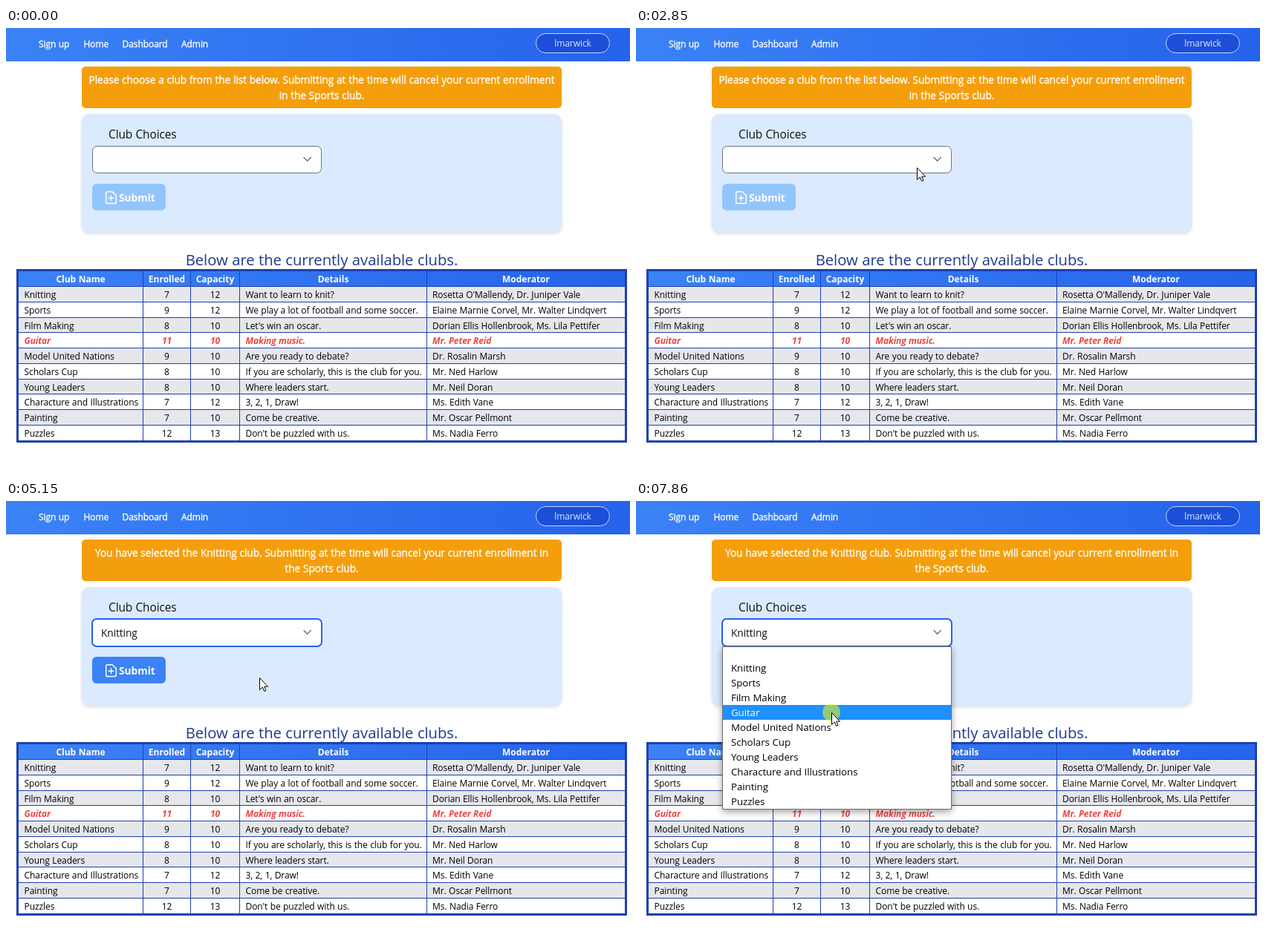
These frames come from a looping animation (840x600 px, 7990 ms). An HTML page:

```html
<!DOCTYPE html>
<html lang="en">
<head>
<meta charset="utf-8">
<title>Club enrollment</title>
<style>
html, body { margin: 0; width: 100%; height: 100%; overflow: hidden; background: #fff; }
svg { position: absolute; left: 0; top: 0; }
svg, #list { font: 12px "Open Sans", "Noto Sans", sans-serif; letter-spacing: -.006em; word-spacing: .03em; }
.bold { font-weight: 700; letter-spacing: 0; }
.full { font-weight: 700; font-style: italic; letter-spacing: -.01em; fill: #ef4444; }
.mid { text-anchor: middle; }
.nav, .note { fill: #fff; stroke: #fff; stroke-width: .35px; }
.note { font-size: 13.7px; text-anchor: middle; }
.grid { stroke: #1e40af; fill: none; shape-rendering: crispEdges; }
#panel { filter: drop-shadow(0 2px 2px rgba(0,0,0,.13)); }
#list { position: absolute; left: 116px; top: 196px; width: 309px; height: 220px; box-shadow: 0 3px 9px rgba(0,0,0,.38); }
#items { position: absolute; inset: 0; box-sizing: border-box; border: 1px solid #707070; background: #fff; overflow: hidden; font-size: 13.3px; color: #000; }
#items div { position: absolute; left: 0; right: 0; height: 20px; line-height: 20px; padding-left: 11px; white-space: pre; }
#items .on { background: #1e90ff; color: #fff; }
</style>
</head>
<body>
<svg id="page" width="840" height="600">
  <defs>
    <linearGradient id="blue"><stop stop-color="#3b82f6"/><stop offset="1" stop-color="#2563eb"/></linearGradient>
  </defs>
  <rect width="840" height="45" fill="url(#blue)"/>
  <g class="nav">
    <text x="44" y="26">Sign up</text>
    <text x="104.5" y="26">Home</text>
    <text x="156.5" y="26">Dashboard</text>
    <text x="236" y="26">Admin</text>
  </g>
  <rect x="713.5" y="7.5" width="99" height="26" rx="13" fill="#1d4ed8" stroke="#bfdbfe"/>
  <text class="mid" x="763" y="25" fill="#dbeafe">lmarwick</text>

  <rect x="102" y="52" width="646" height="56" rx="5" fill="#f59e0b"/>
  <text class="note" id="note1" x="425" y="75"></text>
  <text class="note" id="note2" x="425" y="96"></text>

  <rect id="panel" x="102" y="116" width="646" height="160" rx="10" fill="#dbeafe"/>
  <text x="138" y="149" font-size="15.4" fill="#111">Club Choices</text>
  <rect id="field" x="116.5" y="159.5" width="308" height="36" rx="6" fill="#fff"/>
  <path d="M401 174.5l4.7 4.7 4.7-4.7" fill="none" stroke="#6b7280" stroke-width="1.5" stroke-linecap="round"/>
  <text id="choice" x="128" y="183" font-size="13.7" fill="#111"></text>

  <rect id="button" x="116" y="210" width="99" height="36" rx="6"/>
  <path d="M143 220.7h-6.5q-1.8 0-1.8 1.8v12.2q0 1.8 1.8 1.8h10q1.8 0 1.8-1.8v-8.8zM141.5 226v6.4M138.3 229.2h6.4" fill="none" stroke="#fff" stroke-width="1.5" stroke-linejoin="round" stroke-linecap="round"/>
  <text class="bold" x="152" y="234" font-size="13.7" fill="#fff">Submit</text>

  <text class="mid" x="425" y="319.5" font-size="20.3" fill="#1e3a8a">Below are the currently available clubs.</text>
  <g id="table"></g>
</svg>

<div id="list"><div id="items"></div></div>

<svg width="840" height="600">
  <circle id="halo" r="12" fill="#ff0" fill-opacity=".52"/>
  <path id="cursor" d="M.5.5V16.5L4.3 13 6.7 18.5 9 17.5 6.7 12.2H11.5Z" fill="#fff" stroke="#000"/>
</svg>

<script>
const LOOP = 7990;
const $ = id => document.getElementById(id);

const clubs = [
  ["Knitting", 7, 12, "Want to learn to knit?", "Rosetta O'Mallendy, Dr. Juniper Vale"],
  ["Sports", 9, 12, "We play a lot of football and some soccer.", "Elaine Marnie Corvel, Mr. Walter Lindqvert"],
  ["Film Making", 8, 10, "Let's win an oscar.", "Dorian Ellis Hollenbrook, Ms. Lila Pettifer"],
  ["Guitar", 11, 10, "Making music.", "Mr. Peter Reid"],
  ["Model United Nations", 9, 10, "Are you ready to debate?", "Dr. Rosalin Marsh"],
  ["Scholars Cup", 8, 10, "If you are scholarly, this is the club for you.", "Mr. Ned Harlow"],
  ["Young Leaders", 8, 10, "Where leaders start.", "Mr. Neil Doran"],
  ["Characture and Illustrations", 7, 12, "3, 2, 1, Draw!", "Ms. Edith Vane"],
  ["Painting", 7, 10, "Come be creative.", "Mr. Oscar Pellmont"],
  ["Puzzles", 12, 13, "Don't be puzzled with us.", "Ms. Nadia Ferro"]
];
const heads = [["Club Name", 100.5], ["Enrolled", 216.5], ["Capacity", 281.5], ["Details", 440.5], ["Moderator", 700]];
const cellX = [24.5, 216.5, 281.5, 322.5, 574];
const TOP = 348.5, ROW = 20.78;

function buildTable() {
  let out = '<rect x="16" y="327" width="818" height="21" fill="url(#blue)"/>';
  for (const [label, x] of heads) out += `<text class="bold mid" x="${x}" y="343" fill="#fff">${label}</text>`;
  let lines = "M184.5 327V557M248.5 327V557M314.5 327V557M566.5 327V557";
  clubs.forEach((club, i) => {
    const y = Math.floor(TOP + i * ROW);
    const next = Math.floor(TOP + (i + 1) * ROW);
    const row = club[1] > club[2] ? "full" : "";
    out += `<rect x="16" y="${y}" width="818" height="${next - y}" fill="${i % 2 ? "#fff" : "#e5e7eb"}"/>`;
    club.forEach((cell, c) => {
      const mid = c === 1 || c === 2 ? "mid" : "";
      out += `<text class="${row} ${mid}" x="${cellX[c]}" y="${Math.round(364 + i * 20.75)}">${cell}</text>`;
    });
    lines += `M16 ${y + .5}H834`;
  });
  out += `<path class="grid" d="${lines}"/><rect class="grid" x="15.5" y="326.5" width="819" height="231" stroke-width="3"/>`;
  $("table").innerHTML = out;
}

const options = ["", ...clubs.map(c => c[0])].map((label, i) => {
  const el = document.createElement("div");
  el.style.top = i * 20 - 2 + "px";
  el.textContent = label;
  $("items").append(el);
  return el;
});

// start, end, steps, from, control, to, ease power
const moves = [
  [210, 600, 6, [610, 531], [420, 120], [198, 0], 1],
  [610, 1000, 7, [198, 0], [20, 150], [0, 590], 1],
  [1070, 1770, 11, [0, 590], [560, -190], [778, 71], 1.5],
  [2500, 2850, 6, [778, 71], [430, 250], [378, 188], 1.5],
  [3860, 3930, 2, [378, 188], [381, 205], [381, 230], 1],
  [5150, 5690, 9, [381, 230], [276, 256], [172, 231], 1.8],
  [6240, 6440, 4, [172, 231], [220, 215], [261, 183], 1.5],
  [6980, 7270, 5, [261, 183], [259, 225], [260, 263], 1.3],
  [7530, 7660, 3, [260, 263], [262, 275], [263, 285], 1]
];

// mode of the drop-down from each time on
const modes = [[0, "none"], [3120, "ghost"], [3190, "black"], [3550, "open"], [4330, "none"],
  [6590, "ghost"], [6660, "black"], [6870, "open"]];
const clicks = [[3120, 3330], [4130, 4330], [6590, 6800], [7860, LOOP]];

function cursorAt(t) {
  let pos = moves[0][3];
  for (const [t0, t1, n, a, c, b, power] of moves) {
    if (t < t0) break;
    const step = Math.min(n, Math.floor((t - t0) / (t1 - t0) * (n - 1) + 1e-6) + 1);
    const s = 1 - (1 - step / n) ** power;
    pos = a.map((v, k) => (1 - s) ** 2 * v + 2 * s * (1 - s) * c[k] + s * s * b[k]);
  }
  return pos.map(Math.round);
}

const attr = (id, values) => {
  for (const k in values) $(id).setAttribute(k, values[k]);
};
const show = (id, on) => { $(id).style.display = on ? "" : "none"; };

function draw(t) {
  const [x, y] = cursorAt(t);
  attr("cursor", { transform: `translate(${x} ${y})` });
  attr("halo", { cx: x, cy: y });
  show("cursor", t >= 70);
  show("halo", clicks.some(([a, b]) => t >= a && t < b));

  const picked = t >= 4330;
  const noted = t >= 4400;
  $("choice").textContent = picked ? "Knitting" : "";
  $("note1").textContent = noted
    ? "You have selected the Knitting club. Submitting at the time will cancel your current enrollment in"
    : "Please choose a club from the list below. Submitting at the time will cancel your current enrollment";
  $("note2").textContent = noted ? "the Sports club." : "in the Sports club.";

  const focus = t >= 3120;
  attr("field", focus
    ? { x: 116, y: 159, width: 309, height: 37, stroke: "#2563eb", "stroke-width": 2 }
    : { x: 116.5, y: 159.5, width: 308, height: 36, stroke: "#6b7280", "stroke-width": 1 });

  const hover = x >= 116 && x < 215 && y >= 210 && y < 246;
  attr("button", { fill: !noted ? "#93c5fd" : hover ? "#2563eb" : "#3b82f6" });

  const mode = modes.filter(m => t >= m[0]).pop()[1];
  show("list", mode !== "none");
  show("items", mode === "open");
  $("list").style.background = mode === "black" ? "#000" : "none";
  const active = y >= 195 ? Math.floor((y - 195) / 20) : picked ? 1 : 0;
  options.forEach((el, i) => { el.className = i === active ? "on" : ""; });
}

buildTable();
const start = performance.now();
function tick() {
  draw((performance.now() - start) % LOOP);
  requestAnimationFrame(tick);
}
tick();
</script>
</body>
</html>
```
